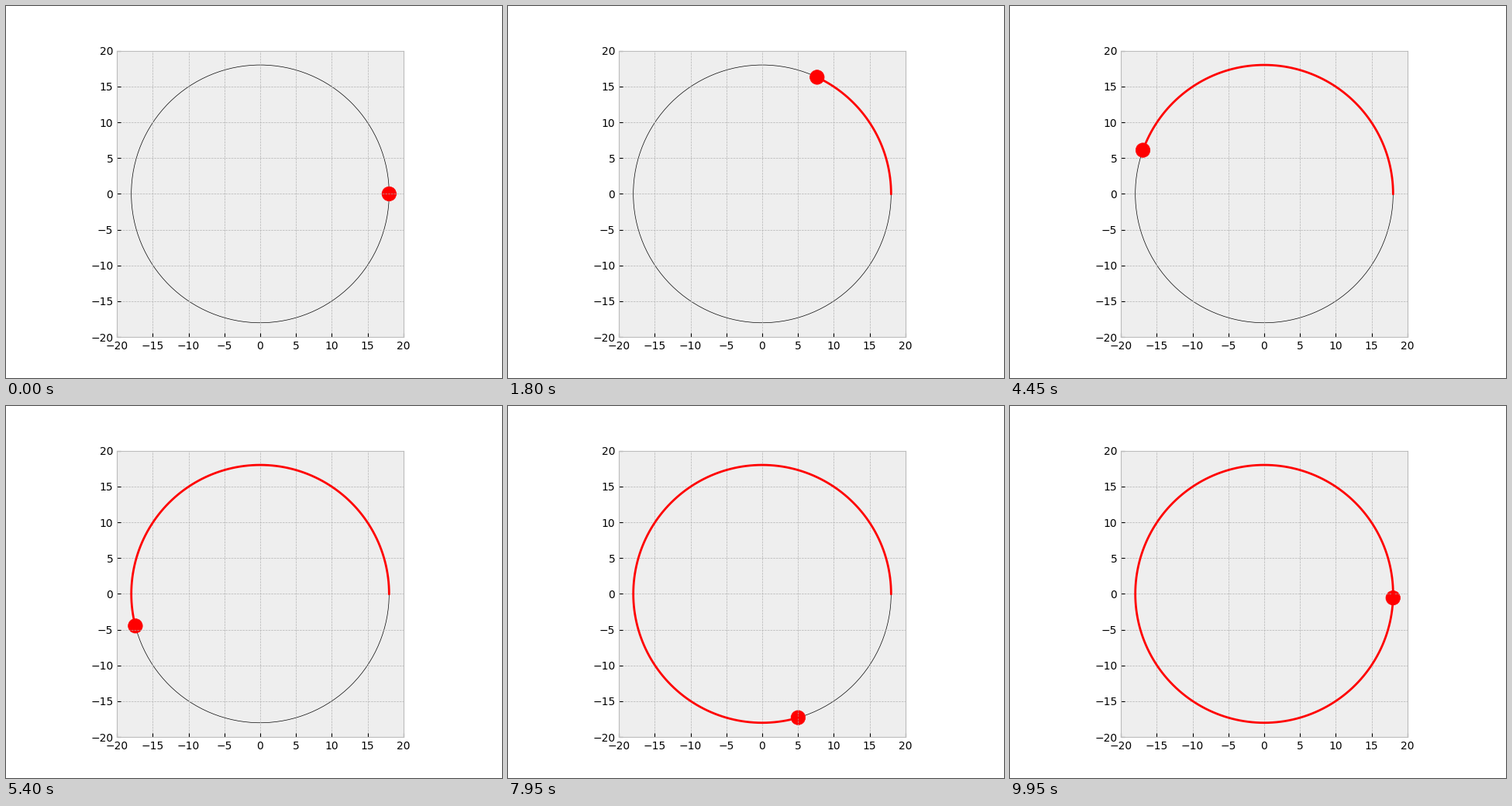
These frames come from a looping animation (640x480 px, 10000 ms). A matplotlib script:

```python
import numpy as np
import matplotlib.pyplot as plt
from matplotlib.animation import FuncAnimation
from matplotlib.patches import Circle

FRAMES = 200
INTERVAL = 50
RADIUS = 18

plt.style.use("bmh")
fig, ax = plt.subplots(figsize=(6.4, 4.8), dpi=100)
ax.set_aspect("equal")
ax.set_xlim(-20, 20)
ax.set_ylim(-20, 20)
ticks = np.arange(-20, 21, 5)
ax.set_xticks(ticks)
ax.set_yticks(ticks)

angles = 2 * np.pi * np.arange(FRAMES) / FRAMES
xs, ys = RADIUS * np.cos(angles), RADIUS * np.sin(angles)

# Patches lie below the grid, the trail above it.
orbit = ax.add_patch(Circle((0, 0), RADIUS, fill=False, ec="black", lw=0.5))
ball = ax.add_patch(Circle((RADIUS, 0), 1, fc="red", ec="red", lw=0.5))
trail, = ax.plot([], [], color="red", lw=2)


def update(i):
    ball.center = xs[i], ys[i]
    trail.set_data(xs[:i + 1], ys[:i + 1])
    return ball, trail


anim = FuncAnimation(fig, update, frames=FRAMES, interval=INTERVAL,
                     repeat=True, repeat_delay=0, blit=False)
plt.show()
```
